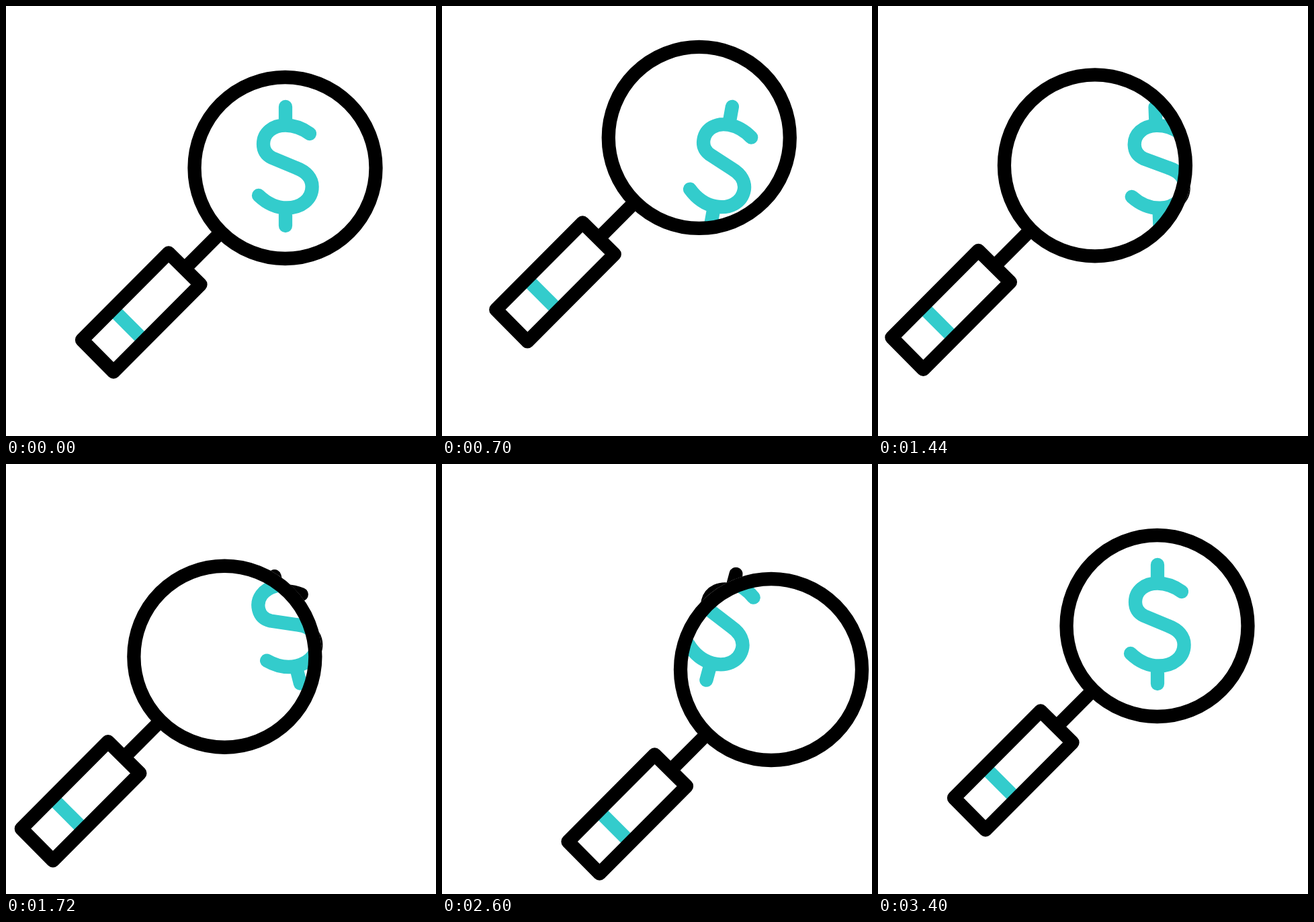
An HTML page with a canvas for the animation above (3.62 s loop, 640x640 px).

```html
<!DOCTYPE html>
<html lang="en">
<head>
<meta charset="utf-8">
<title>Searching for money</title>
<style>
html, body { margin: 0; width: 100%; height: 100%; overflow: hidden; background: #fff; }
canvas { display: block; width: 640px; height: 640px; }
</style>
</head>
<body>
<canvas id="stage" width="640" height="640"></canvas>
<script>
const ctx = document.getElementById('stage').getContext('2d');
const LOOP = 3620, STEP = 20, HOLD = 200, SPAN = 800;
const TEAL = '#33cccc', BLACK = '#000', WEIGHT = 20.3;
const PIVOT = { x: 425, y: 238.5 };

// Lens centre and dollar angle at each key
const spots = [[415.5, 241], [345, 163.3], [332.3, 299], [490, 306], [415.5, 241]];
const angles = [0, 15, -15, 15, 0];

const coin = new Path2D(
  'M416 150V177M416 301V327M452 190C441 182 429 177.5 416 177.5' +
  'C397 177.5 383 189 383 205.5C383 215 388 222 396 226L432 241' +
  'C447 246.5 455.6 257 455.6 269C455.6 288 439 300.5 418 300.5C402 300.5 389 294.5 376 282');
// Smaller copy seen outside the lens
const smallCoin = new Path2D();
smallCoin.addPath(coin, new DOMMatrix([0.9, 0, 0, 0.9, 43.4, 28.1]));

const grip = new Path2D('M242 367.5L289.5 414.5L160 544.5L113 497Z');
const neck = new Path2D('M265.75 391L320 336.7');
const band = new Path2D('M158.4 450.9L205.5 498');

const clamp = (v, a, b) => Math.min(b, Math.max(a, v));
const mix = (a, b, p) => a + (b - a) * p;
const smooth = s => s * s * (3 - 2 * s);

// Accelerate from rest, then run at steady speed
function easeIn(s) {
  let lo = 0, hi = 1;
  for (let i = 0; i < 30; i++) {
    const u = (lo + hi) / 2, v = 1 - u;
    const x = u * v * v + 2.5 * u * u * v + u * u * u;
    if (x < s) lo = u; else hi = u;
  }
  return 2.5 * lo * lo * (1 - lo) + lo * lo * lo;
}

function tangent(i) {
  const a = spots[Math.max(0, i - 1)], b = spots[Math.min(4, i + 1)];
  return [(b[0] - a[0]) / 6, (b[1] - a[1]) / 6];
}

// Sample one curved leg with its running length
function makeLeg(i) {
  const a = spots[i], b = spots[i + 1], ta = tangent(i), tb = tangent(i + 1);
  const at = (u, k) => {
    const v = 1 - u;
    return v * v * v * a[k] + 3 * v * v * u * (a[k] + ta[k]) +
      3 * v * u * u * (b[k] - tb[k]) + u * u * u * b[k];
  };
  const points = [];
  let length = 0;
  for (let n = 0; n <= 200; n++) {
    const x = at(n / 200, 0), y = at(n / 200, 1);
    if (n) length += Math.hypot(x - points[n - 1].x, y - points[n - 1].y);
    points.push({ x, y, d: length });
  }
  return points;
}
const legs = [0, 1, 2, 3].map(makeLeg);

function along(points, p) {
  const goal = p * points[200].d;
  let n = 1;
  while (n < 200 && points[n].d < goal) n++;
  const a = points[n - 1], b = points[n], f = (goal - a.d) / (b.d - a.d);
  return { x: mix(a.x, b.x, f), y: mix(a.y, b.y, f) };
}

function line(path, color) {
  ctx.strokeStyle = color;
  ctx.stroke(path);
}

function drawCoin(path, color, angle) {
  ctx.save();
  ctx.translate(PIVOT.x, PIVOT.y);
  ctx.rotate(angle * Math.PI / 180);
  ctx.translate(-PIVOT.x, -PIVOT.y);
  ctx.lineCap = 'round';
  line(path, color);
  ctx.restore();
}

function circle(x, y, r) {
  ctx.beginPath();
  ctx.arc(x, y, r, 0, Math.PI * 2);
}

function draw(time) {
  const tick = Math.floor((time % LOOP) / STEP) * STEP;
  const k = clamp((tick - HOLD) / SPAN, 0, 4);
  const i = Math.min(3, Math.floor(k)), s = k - i;
  const p = i === 0 ? easeIn(s) : i === 3 ? 1 - easeIn(1 - s) : s;
  const lens = along(legs[i], p);
  const angle = mix(angles[i], angles[i + 1], smooth(s));

  ctx.fillStyle = '#fff';
  ctx.fillRect(0, 0, 640, 640);
  ctx.lineWidth = WEIGHT;
  ctx.lineJoin = 'round';
  ctx.lineCap = 'butt';

  drawCoin(smallCoin, BLACK, angle);

  ctx.save();
  circle(lens.x, lens.y, 145.1);
  ctx.fill();
  circle(lens.x, lens.y, 135);
  ctx.clip();
  drawCoin(coin, TEAL, angle);
  ctx.restore();

  ctx.save();
  ctx.translate(lens.x - spots[0][0], lens.y - spots[0][1]);
  ctx.fill(grip);
  line(band, TEAL);
  line(neck, BLACK);
  line(grip, BLACK);
  ctx.restore();

  circle(lens.x, lens.y, 135);
  ctx.strokeStyle = BLACK;
  ctx.stroke();
}

const start = performance.now();
function loop() {
  draw(performance.now() - start);
  requestAnimationFrame(loop);
}
loop();
</script>
</body>
</html>
```
